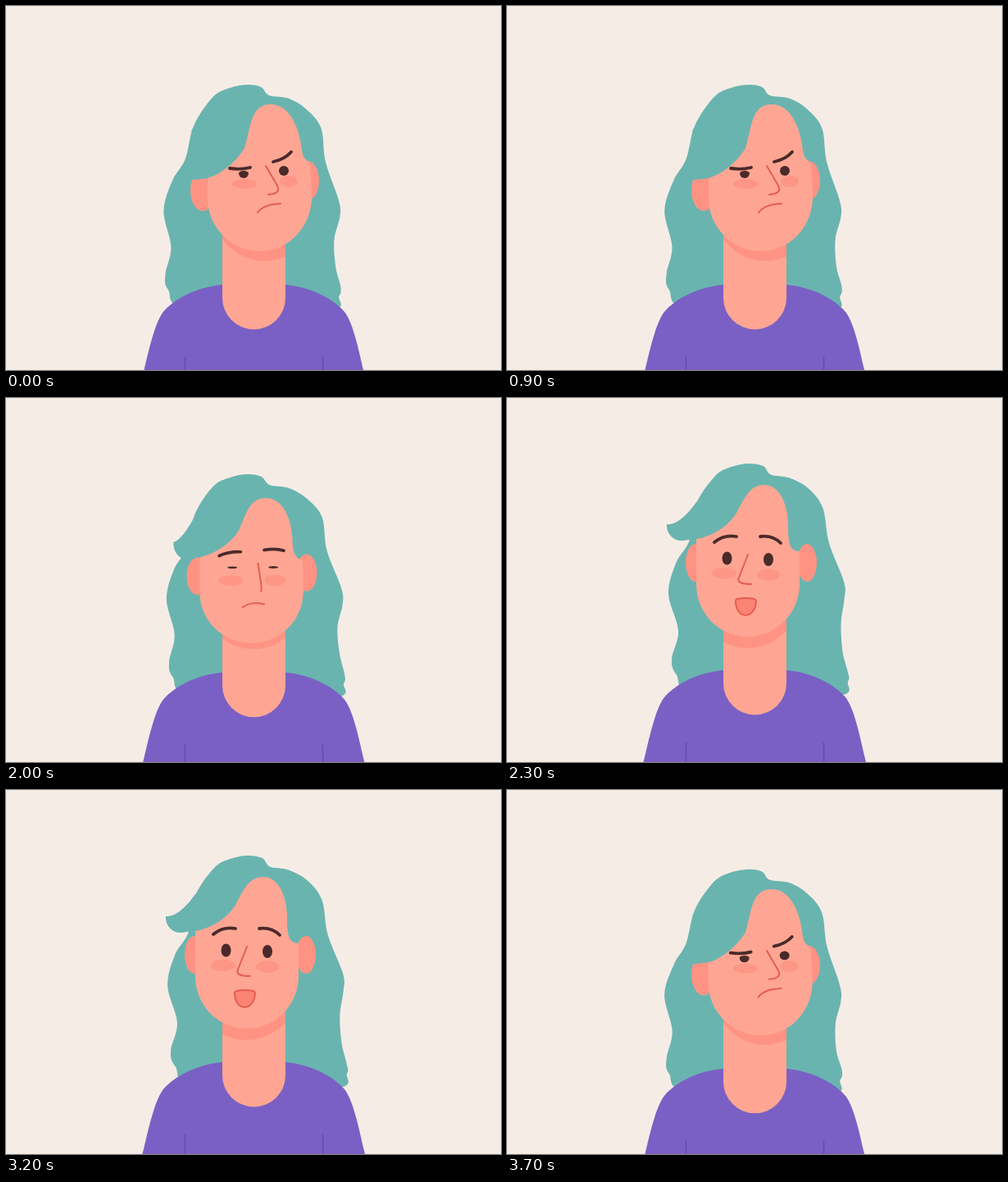
These frames come from a looping animation (604x444 px, 3.8 s). An HTML page:

```html
<!DOCTYPE html>
<html lang="en">
<head>
<meta charset="utf-8">
<title>Mood swing</title>
<style>
  html, body { margin: 0; width: 100%; height: 100%; overflow: hidden; background: #f6ece6; }
  svg { display: block; width: 100%; height: 100%; }
  .hair { fill: #6ab4b0; }
  .skin { fill: #fea693; }
  .shade { fill: #ff9383; }
  .cheek { fill: #fe9686; }
  .line { fill: none; stroke: #e65c55; stroke-width: 2; stroke-linecap: round; stroke-linejoin: round; }
  .brow { fill: none; stroke: #4a2a2a; stroke-width: 3.8; stroke-linecap: round; }
  .eye { fill: #4a2a2a; }
  #mouth { fill: #fb8474; }
</style>
</head>
<body>
<svg viewBox="0 0 604 444">
  <clipPath id="neckClip"><path id="neck" d="M264,240V356A38.5,38.5 0 0 0 341,356V240Z"/></clipPath>
  <path id="hair" class="hair"/>
  <g id="body">
    <path fill="#7a60c4" d="M159,480L168.5,444C176,412 183,384 192,373C206,357 232,343 264,340H341C373,343 399,357 413,373C422,384 429,412 436,444L445,480Z"/>
    <path fill="none" stroke="#6849b4" stroke-width="1.6" d="M218.500,428L218,480M386.500,428L387,480"/>
    <use href="#neck" class="skin"/>
    <g clip-path="url(#neckClip)"><path id="shade" class="shade"/></g>
  </g>
  <g id="head">
    <path id="earL" class="shade"/>
    <path id="earR" class="shade"/>
    <path id="face" class="skin"/>
    <path id="fringe" class="hair"/>
    <path id="cheekL" class="cheek"/>
    <path id="cheekR" class="cheek"/>
    <path id="eyeL" class="eye"/>
    <path id="eyeR" class="eye"/>
    <path id="nose" class="line"/>
    <path id="mouth" class="line"/>
    <path id="browL" class="brow"/>
    <path id="browR" class="brow"/>
  </g>
</svg>
<script>
const LOOP = 3800, STEP = 100, TURN = 450;
const set = (id, d, name = 'd') => document.getElementById(id).setAttribute(name, d);
const lerp = (a, b, u) => a + (b - a) * u;
const clamp = x => Math.min(1, Math.max(0, x));

// Each shape has a cross and a cheerful pose.
const shapes = {
  face: [
    'M246,210C265,204 282,188 291,173C299,150 297,120 323,120C346,120 358,148 361,176C362,186 367,188 371,192L373,233C373,268 346,299 310,299C273,299 246,268 246,235Z',
    'M231,172C252,168 270,156 280,140C290,122 296,106 314,106C332,106 342,128 343,152C343,172 343,187 357,187L357,227C357,261 330,291 294,291C258,291 231,262 231,227Z'],
  fringe: [
    'M221,190C222,180 224,165 227,150L270,130L291,173C282,188 265,204 246,210C238,211 232,212 227,212C224,212 221,200 221,190Z',
    'M195,154C208,155 221,141 231,127L265,105L280,140C270,156 252,168 231,172C224,172 218,174 212,174C204,174 194,166 195,154Z'],
  browL: ['M273,198Q286,200 298,197', 'M253,176Q265,166 280,169'],
  browR: ['M326,190Q340,187 348,178', 'M309,169Q324,167 334,177'],
  nose: ['M317,195L331,219Q336,229 320,230', 'M294,191L283,219Q279,227 298,227']
};

// x, y, half width, height above, height below
const ovals = {
  earL: [[240, 225, 15, 25, 25], [230, 201, 12, 23, 23]],
  earR: [[368, 213, 14, 24, 24], [366, 201, 12, 23, 23]],
  cheekL: [[291, 217, 15, 6, 6], [265, 214, 15, 7, 7]],
  cheekR: [[345, 214, 11, 7, 7], [319, 215.5, 14, 7.5, 7.5]],
  eyeL: [[290, 204, 6, 3, 6], [268.5, 195.5, 6, 8, 8]],
  eyeR: [[339, 201, 6, 6, 6], [319, 197, 6, 8, 8]]
};

const hair = ('321,109 345,113 367,126 384,149 390,190 406,236 407,256 401,285 402,318 408,342 407,354 390,372 ' +
  '225,370 198,346 194,327 202,294 192,250 203,213 219,187 229,145 253,111 273,100 295,96 312,99')
  .split(' ').map(p => p.split(',').map(Number));

function morph([a, b], u) {
  const num = /[\d.]+/g, end = b.match(num);
  let n = 0;
  return a.replace(num, x => lerp(+x, +end[n++], u).toFixed(2));
}

function oval([a, b], u, open = 1) {
  const [x, y, r, up, down] = a.map((v, i) => lerp(v, b[i], u));
  return `M${x - r},${y}A${r},${up * open} 0 0 1 ${x + r},${y}A${r},${down * open} 0 0 1 ${x - r},${y}Z`;
}

// A bowed line whose lower lip drops as it opens
function mouth(u) {
  const open = clamp((u - .65) / .35);
  const x1 = lerp(307, 279, u), x2 = lerp(335, 304, u);
  const y1 = lerp(252, 247, u), y2 = lerp(241, 247, u);
  const top = lerp(242, 243, u), low = top + open * 28, wide = open * 7;
  const a = lerp(x1, x2, .27), b = lerp(x1, x2, .7);
  return `M${x1},${y1}C${a - wide},${top} ${b + wide},${top} ${x2},${y2}` +
    `C${b + wide},${low} ${a - wide},${low} ${x1},${y1}Z`;
}

// Closed smooth curve through the points
function smooth(pts) {
  const n = pts.length, p = i => pts[(i + n) % n];
  return 'M' + p(0) + pts.map((b, i) => {
    const a = p(i - 1), c = p(i + 1), d = p(i + 2);
    const h1 = b.map((v, k) => v + (c[k] - a[k]) / 6);
    const h2 = c.map((v, k) => v - (d[k] - b[k]) / 6);
    return `C${h1} ${h2} ${c}`;
  }).join('') + 'Z';
}

function draw(t) {
  const there = clamp((t - 1800) / TURN), back = clamp((t - 3300) / TURN);
  const ease = x => Math.sin(x * Math.PI / 2);
  const nod = x => Math.sin(x * Math.PI) ** 2;
  const u = ease(there) - ease(back), dip = nod(there) + nod(back);

  for (const id in shapes) set(id, morph(shapes[id], id === 'nose' ? u * u : u));
  for (const id in ovals) set(id, oval(ovals[id], u, id.startsWith('eye') ? 1 - .82 * dip : 1));
  set('mouth', mouth(u));
  set('head', `translate(0 ${15 * dip}) scale(1 ${1 - dip / 30})`, 'transform');

  // Hair leans and lifts with the turn; its edge ripples slightly.
  const phase = t / LOOP * Math.PI * 8;
  set('hair', smooth(hair.map(([x, y], i) => {
    const fall = y - 96, ripple = .6 * Math.sin(i * 2.4 + phase);
    return [x + u * fall * .033 + ripple, y + u * (fall * .03 - 16) + dip * (340 - y) / 32];
  })));

  const lift = -8 * u;
  set('body', `translate(0 ${lift})`, 'transform');
  set('shade', morph(shapes.face, u));
  set('shade', `translate(${lerp(6, 0, u)} ${lerp(12, 14, u) - lift - dip})`, 'transform');
}

const start = performance.now();
function tick() {
  const t = (performance.now() - start) % LOOP;
  draw(Math.floor(t / STEP) * STEP);
  requestAnimationFrame(tick);
}
tick();
</script>
</body>
</html>
```
